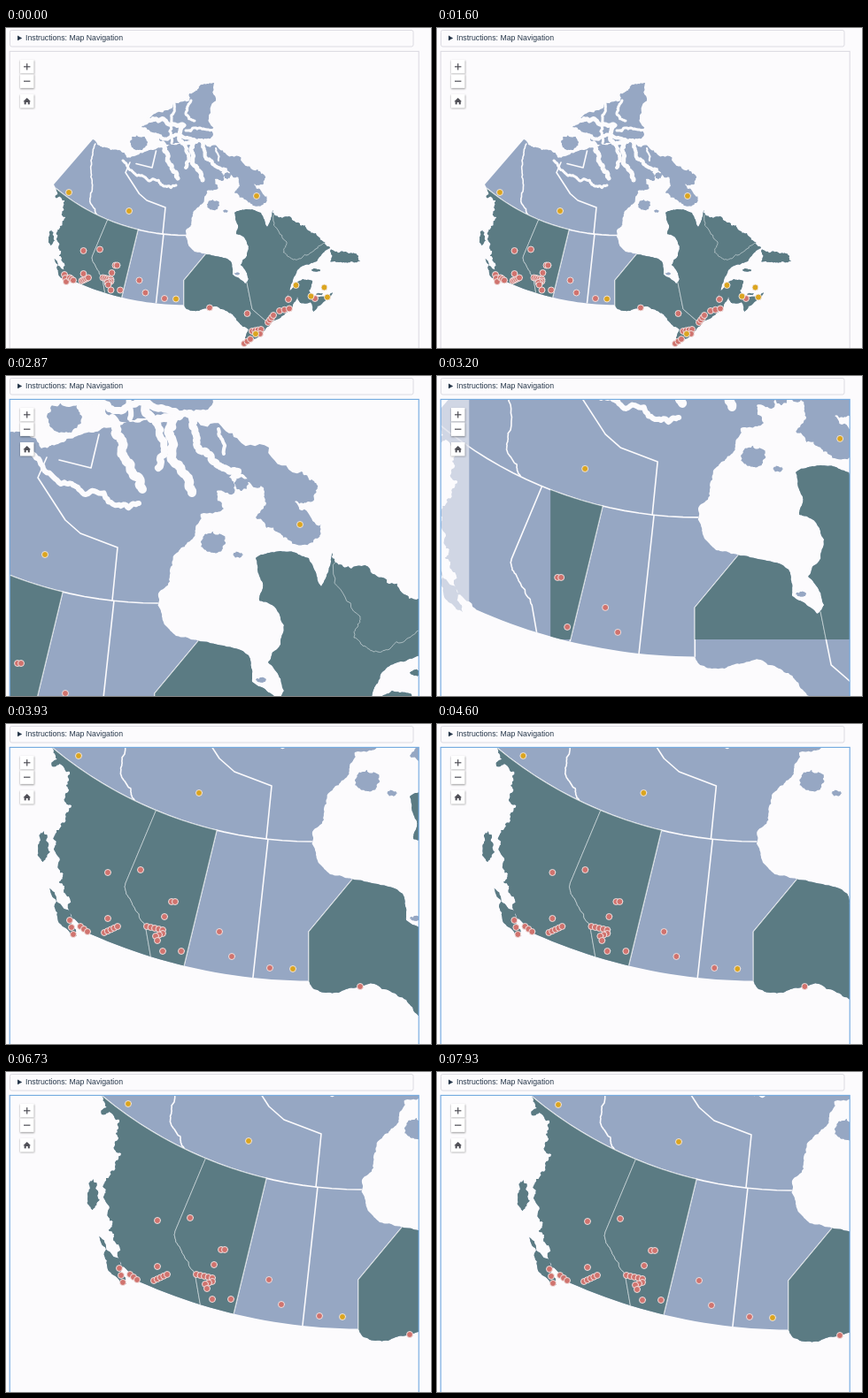
Animation, 480 px wide and 362 px high, one loop 8 s. Source, as an HTML page with a canvas:

```html
<!DOCTYPE html>
<html lang="en">
<head>
<meta charset="utf-8">
<title>Map navigation</title>
<style>
  html, body { margin: 0; width: 100%; height: 100%; overflow: hidden; background: #fcfbfd; }
  canvas { position: absolute; left: 0; top: 0; }
  .title {
    position: absolute; left: 22px; top: 6px; white-space: nowrap;
    font: 8.72px/11px "Liberation Sans", Arial, sans-serif; color: #26374a;
  }
</style>
</head>
<body>
<canvas id="stage" width="480" height="362"></canvas>
<div class="title">Instructions: Map Navigation</div>
<script>
const ctx = document.getElementById('stage').getContext('2d');
const LOOP = 8000;
const PAGE = '#fcfbfd', BLUE = '#96a7c3', DARK = '#5b7b83', PINK = '#d0736e', GOLD = '#dba51f';

let seed = 11;
const rand = () => (seed = (seed * 16807) % 2147483647) / 2147483647;
const mix = (a, b, p) => a + (b - a) * p;
const points = text => text.split(' ').map(p => p.split(',').map(Number));

// Conic projection: parallels are circles around the pole, meridians are rays.
const POLE = [202.7, 5.5], R60 = 229, R49 = 307.8;
const W120 = 22.6, W110 = 13.57, W102 = 6.2, W95 = 0.3;
function at(deg, r) {
  const a = deg * Math.PI / 180;
  return [POLE[0] - r * Math.sin(a), POLE[1] + r * Math.cos(a)];
}
const parallel = (r, from, to) => Array.from({ length: 25 }, (_, i) => at(mix(from, to, i / 24), r));

// Midpoint displacement gives a ragged shoreline between a few points.
function ragged(pts, rough, depth = 4) {
  if (!depth) return pts;
  const out = [pts[0]];
  for (let i = 1; i < pts.length; i++) {
    const [ax, ay] = pts[i - 1], [bx, by] = pts[i];
    const d = (rand() * 2 - 1) * rough;
    out.push([(ax + bx) / 2 - (by - ay) * d, (ay + by) / 2 + (bx - ax) * d], pts[i]);
  }
  return ragged(out, rough, depth - 1);
}
const shore = (text, rough) => ragged(points(text), rough);

function trace(pts, close, path = new Path2D()) {
  pts.forEach(([x, y], i) => i ? path.lineTo(x, y) : path.moveTo(x, y));
  if (close) path.closePath();
  return path;
}

function blob(x, y, rx, ry) {
  const ring = Array.from({ length: 8 }, (_, i) => {
    const a = i * Math.PI / 4;
    return [x + rx * Math.cos(a), y + ry * Math.sin(a)];
  });
  return ragged([...ring, ring[0]], 0.25, 3);
}

const land = trace([
  shore('98,126 103,132 118,138 128,138 137,147 143,145 160,139 180,134 200,131 224,131', 0.16),
  shore('224,131 250,144 284,160 293,168 291,176 280,177 295,190 294,197 277,199 264,192 258,186 264,178 261,168 248,160', 0.26),
  shore('248,160 243,163 246,172 236,171 240,181 227,184 224,192 219,201 211,213 203,229', 0.18),
  shore('203,229 205,242 213,253 225,255.5 254,264 256,279 270,289', 0.1),
  shore('270,289 274,284 265,268 272,258 274,247 269,237 260,233 262,223 258,209 272,205 288,209 295,225 301,206', 0.1),
  shore('301,206 312,215 332,223 350,232 366,249', 0.3),
  shore('366,249 351,264 338,268 329,274 324,285 316,307', 0.1),
  shore('316,307 327,290 335,284 346,286 342,297 349,305 360,304 369,299 347,321 344,310 332,311 329,304 322,318', 0.12),
  shore('322,318 300,333 288,347 268,358 274,341 262,332 256,324 238,315 222,318 204,318 201,313.5', 0.12),
  parallel(R49, W95, 24),
  shore('77,286 65.5,265.5 60,257 62.5,253 57,239 58.5,228 67,214 64,203 66,195 56,192 57,183', 0.3),
  points('54,177 98,126')
].flat(), true);
[
  shore('54,260 66,274 70,288 59,277 54,260', 0.16),
  shore('367,250 384,253 398,258 400,264 384,265 366,264 367,250', 0.2),
  shore('153,112 162,102 190,85 206,83 207,74 222,64 235,62 229,101 231,125 210,127 180,131 163,118 153,112', 0.2),
  blob(51, 237, 3, 9),
  blob(150, 129, 10, 9),
  blob(350, 274, 5, 1.5),
  blob(354, 301, 4, 1)
].forEach(pts => trace(pts, true, land));

const northern = [blob(234, 200, 7, 6), blob(250, 167, 4, 4), blob(248, 207, 3, 1.5), blob(261, 278, 3, 1.5)];
const islands = new Path2D();
northern.forEach(pts => trace(pts, true, islands));

// Straits cut through the northern land: width, course.
const straits = [
  [3, '132,150 148,167 162,173 180,179 192,178'],
  [5, '177,130 183,146 188,160 194,170'],
  [4, '198,128 204,140 203,158'],
  [5, '213,128 211,146 216,160 222,172'],
  [4, '222,130 226,148 236,156 248,160'],
  [2, '237,136 240,150'],
  [3, '203,116 213,113 236,114'],
  [3, '209,82 203,97 213,105'],
  [3, '188,84 187,104 187,130'],
  [5, '155,107 178,103 201,110 199,130'],
  [4, '150,121 170,121 186,123 215,129']
].map(([width, text]) => [width, trace(shore(text, 0.22))]);

const rockies = [at(W120, R60), ...shore('97.5,258 103,273 109,284', 0.12), at(17.2, R49)];
const ottawa = points('272,288 278,318 293,331 300,333');
const inlet = points('225.5,256 201,285.5');
const borders = [
  parallel(R60, 50, 0),
  rockies,
  shore('101,131 96,150 95.5,187 96,199 102.5,211', 0.12),
  [at(W110, R60), at(W110, R49)],
  [at(W102, R60), at(W102, R49)],
  points('140,152 135,163.5 150.5,187.5 159,195 180,203 177,233'),
  points('169.5,139 165,158 147,153.5'),
  [...inlet, at(W95, R49)],
  ottawa
].map(pts => trace(pts));
const labrador = trace(shore('304.5,208.5 317,242 313.5,254 324.5,262 334,260 350,250 366,241', 0.2));
const provinces = [
  [...parallel(R60, 50, W120), ...rockies, ...parallel(330, 17, 50)],
  [...parallel(R60, W120, W110), ...parallel(R49 + 1, W110, 17.2), ...rockies.slice().reverse()],
  [at(W95, R49 + 15), ...inlet.slice().reverse(), ...points('230,250 256,260'), ...ottawa, ...points('306,340 300,370 200,370')],
  [...ottawa.slice().reverse(), ...points('256,262 250,203 410,203 410,365 303,340')]
].map(pts => trace(pts, true));

// Towns along a corridor: start, end, count.
const run = (x1, y1, x2, y2, n) => Array.from({ length: n }, (_, i) =>
  [mix(x1, x2, i / (n - 1)), mix(y1, y2, i / (n - 1))]);
const pinkDots = [
  run(66, 279, 68, 287, 3),
  run(72, 282.5, 76, 285.5, 3),
  run(85.5, 286, 93, 282.5, 5),
  run(109.5, 282.5, 118.5, 284.5, 5),
  run(118.5, 286.5, 114.5, 288, 3),
  run(123.5, 268.5, 125.5, 268.5, 2),
  run(118.5, 296.5, 129, 296.5, 2),
  run(150.5, 285.5, 157.5, 299.5, 2),
  run(269, 357, 276, 352, 3),
  run(278, 343, 288, 341, 4),
  run(296, 333, 302, 325, 4),
  run(309, 320, 320, 317.5, 3),
  points('87.5,252 106,250.5 119.5,277 87.5,278 115.5,290.5 179,306 230,316.5 272.5,323 319,307 287,346 349,306')
].flat();
const goldDots = points('71,186 139,207 283,190 192,306.5 327.5,291 344.5,303.5 359.5,293.5 363,304.5 282,346');

const ZOOM_START = 1937, ZOOM_END = 2437, DRAG = 2890, REDRAW = 3530;
const keys = [
  [ZOOM_END, -234, -212], [DRAG, -234, -212], [3200, -111, -309], [3510, -60, -336],
  [4450, -60, -336], [5000, -4, -336], [7330, -4, -336], [7400, -5, -335], [LOOP, -5, -335]
];

// Screen position = map position * s + (x, y); k is the symbol size.
function viewAt(t) {
  if (t < ZOOM_END) {
    const p = Math.max(0, (t - ZOOM_START) / (ZOOM_END - ZOOM_START));
    const s = 1 + (1 - Math.cos(Math.PI * p)) / 2;
    return { s, k: s, x: -234.5 * (s - 1), y: -212 * (s - 1) };
  }
  const i = keys.findIndex(key => t < key[0]);
  const [a, b] = [keys[i - 1], keys[i]];
  const p = (t - a[0]) / (b[0] - a[0]);
  return { s: 2, k: 1, x: mix(a[1], b[1], p), y: mix(a[2], b[2], p) };
}

function scoped(draw) {
  ctx.save();
  draw();
  ctx.restore();
}

function clipBox(x, y, w, h) {
  ctx.beginPath();
  ctx.rect(x, y, w, h);
  ctx.clip();
}

function baseLayer(px) {
  ctx.fillStyle = BLUE;
  ctx.fill(land);
  ctx.strokeStyle = PAGE;
  ctx.lineJoin = ctx.lineCap = 'round';
  scoped(() => {
    ctx.clip(land);
    ctx.lineWidth = 1.6 * px;
    borders.forEach(b => ctx.stroke(b));
  });
  straits.forEach(([width, path]) => {
    ctx.lineWidth = width;
    ctx.stroke(path);
  });
  ctx.fill(islands);
}

function provinceLayer(px) {
  ctx.clip(land);
  ctx.fillStyle = DARK;
  ctx.strokeStyle = '#ced8dc';
  ctx.lineWidth = 0.7 * px;
  provinces.forEach(p => { ctx.fill(p); ctx.stroke(p); });
  ctx.stroke(labrador);
}

function dot([x, y], color, px) {
  ctx.beginPath();
  ctx.arc(x, y, 3.5 * px, 0, 7);
  ctx.fillStyle = color;
  ctx.fill();
  ctx.strokeStyle = '#f3e9e9';
  ctx.lineWidth = 0.9 * px;
  ctx.stroke();
}

function drawMap(t) {
  const v = viewAt(t), px = v.k / v.s;
  ctx.translate(v.x, v.y);
  ctx.scale(v.s, v.s);
  // Areas that were off screen before the drag arrive late.
  const partial = t >= ZOOM_END && t < REDRAW;
  const loaded = ([x, y]) => !partial || (x > 120 && y < 303.5);
  if (partial) {
    scoped(() => { clipBox(73.5, 0, 500, 500); baseLayer(px); });
    scoped(() => {
      clipBox(-100, 0, 173.5, 500);
      ctx.globalAlpha = Math.min(1, Math.max(0, (t - 3060) / 320));
      baseLayer(px);
    });
  } else baseLayer(px);
  scoped(() => {
    if (partial) clipBox(119.5, 0, 231, 303.5);
    provinceLayer(px);
  });
  pinkDots.filter(loaded).forEach(p => dot(p, PINK, px));
  goldDots.filter(loaded).forEach(p => dot(p, GOLD, px));
}

function button(y) {
  scoped(() => {
    ctx.shadowColor = 'rgba(0,0,0,.38)';
    ctx.shadowBlur = 2;
    ctx.shadowOffsetY = 0.8;
    ctx.fillStyle = '#fff';
    ctx.fillRect(16, y, 15.5, 15.5);
  });
}

function drawControls() {
  [36, 52.4, 75].forEach(button);
  ctx.fillStyle = '#505057';
  ctx.fillRect(20, 43.2, 7.4, 1.2);
  ctx.fillRect(23.1, 40.1, 1.2, 7.4);
  ctx.fillRect(20, 59.6, 7.4, 1.2);
  ctx.fill(trace(points('19.4,83.2 23.7,79 28,83.2')));
  ctx.fillRect(20.6, 83, 2.1, 3.4);
  ctx.fillRect(24.7, 83, 2.1, 3.4);
  ctx.fillRect(22, 83, 3.4, 1);
}

function drawPage(t) {
  ctx.fillStyle = PAGE;
  ctx.fillRect(0, 0, 480, 362);
  ctx.strokeStyle = '#dcdbe2';
  ctx.lineWidth = 1;
  ctx.beginPath();
  ctx.roundRect(4.5, 2.5, 455.5, 18.5, 2);
  ctx.stroke();
  ctx.fillStyle = '#26374a';
  ctx.fill(trace(points('13,8.6 18.2,11.4 13,14.2')));
  scoped(() => { clipBox(4, 27, 462, 335); drawMap(t); });
  ctx.strokeStyle = t < 1730 ? '#dcdbe2' : '#6fa8df';
  ctx.lineWidth = 1.1;
  ctx.strokeRect(4.2, 26.4, 462, 368);
  drawControls();
}

const start = performance.now();
function frame() {
  drawPage((performance.now() - start) % LOOP);
  requestAnimationFrame(frame);
}
frame();
</script>
</body>
</html>
```
